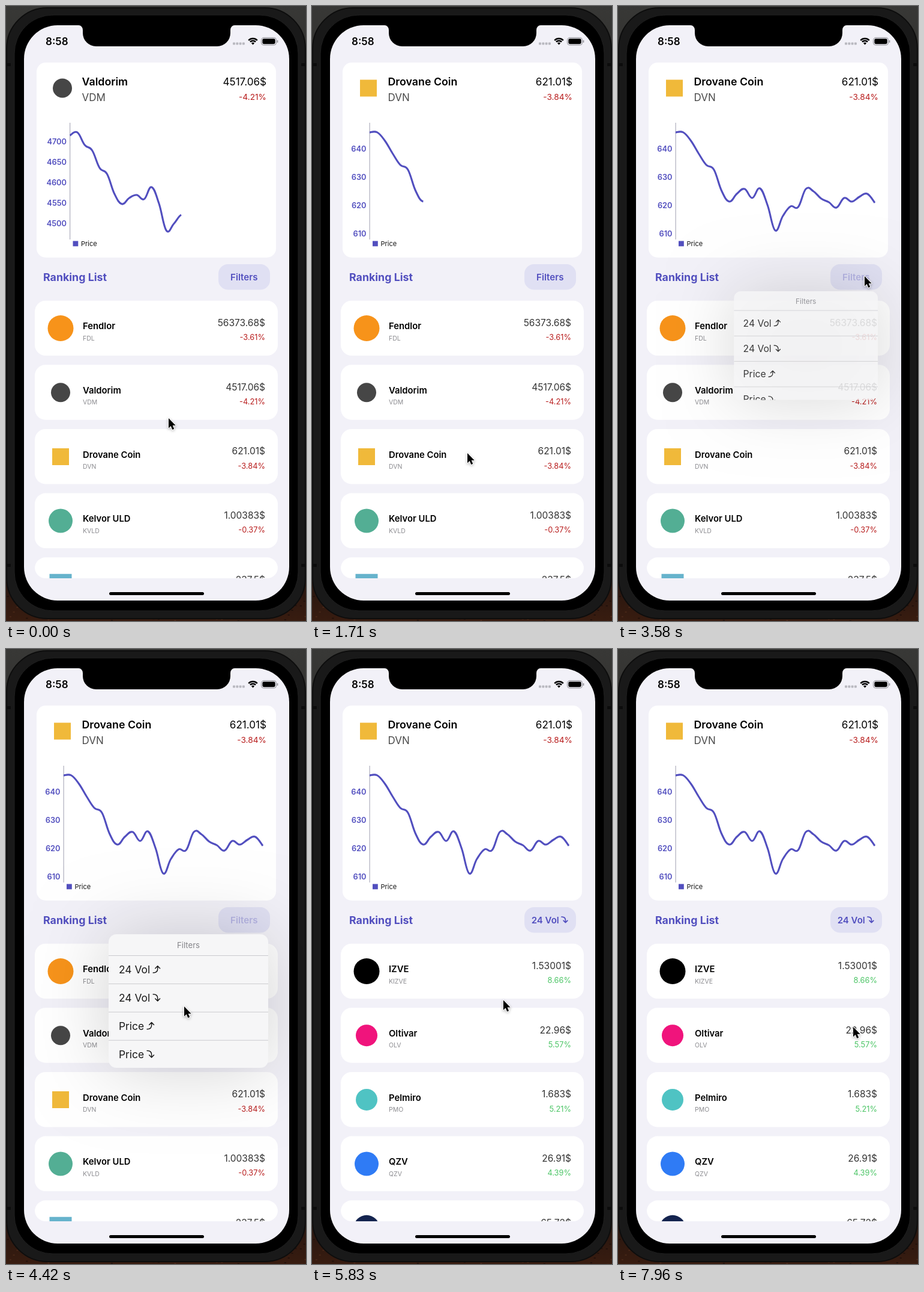
An HTML page with a canvas that plays this animation: 500x1022 px, repeating every 8000 ms.

```html
<!DOCTYPE html>
<html lang="en">
<head>
<meta charset="utf-8">
<title>Price tracker</title>
<style>
  html, body { margin: 0; width: 100%; height: 100%; overflow: hidden; background: #1a1512; }
  canvas { display: block; width: 500px; height: 1022px; }
</style>
</head>
<body>
<canvas id="stage" width="500" height="1022"></canvas>
<script>
const ctx = document.getElementById('stage').getContext('2d');
const LOOP = 8000, DRAW_TIME = 1500;
const COIN_SWITCH = 1185, MENU_OPEN = 3490, MENU_CLOSE = 4960, CLOSE_TIME = 200;
const INDIGO = '#524fbf', RED = '#b81d1d', GREEN = '#4cc566';

// Coins: name, code, price, change, icon shape, icon half size, icon colour
const coin = (name, code, price, change, shape, half, color) =>
  ({ name, code, price, change, shape, half, color });

const valdorim = coin('Valdorim', 'VDM', '4517.06$', '-4.21%', 'circle', 16, '#464646');
const drovane = coin('Drovane Coin', 'DVN', '621.01$', '-3.84%', 'square', 14, '#f0b93a');
const byRank = [
  coin('Fendlor', 'FDL', '56373.68$', '-3.61%', 'circle', 21.5, '#f7931a'),
  valdorim,
  drovane,
  coin('Kelvor ULD', 'KVLD', '1.00383$', '-0.37%', 'circle', 20, '#53ae94'),
  coin('', '', '237.5$', '', 'square', 18.5, '#66b3cc'),
];
const byVolume = [
  coin('IZVE', 'KIZVE', '1.53001$', '8.66%', 'circle', 21.5, '#000'),
  coin('Oltivar', 'OLV', '22.96$', '5.57%', 'circle', 18, '#f0147c'),
  coin('Pelmiro', 'PMO', '1.683$', '5.21%', 'circle', 18, '#4fc3c3'),
  coin('QZV', 'QZV', '26.91$', '4.39%', 'circle', 20, '#2f7bf5'),
  coin('', '', '65.72$', '', 'circle', 21.5, '#14244f'),
];

const charts = [
  { coin: valdorim, start: -835, axisX: 106.5, firstTick: 225, tickGap: 34.2,
    ticks: [4700, 4650, 4600, 4550, 4500],
    line: [215, 210, 231, 240, 269, 279, 312, 329, 319, 314, 321, 301, 328, 373,
           362, 347, 348, 320, 322, 332, 336, 344, 330, 334, 327, 323, 335] },
  { coin: drovane, start: COIN_SWITCH, axisX: 96, firstTick: 237, tickGap: 47.2,
    ticks: [640, 630, 620, 610],
    line: [210, 210, 224, 245, 264, 272, 307, 325, 312, 304, 319, 303, 331, 373,
           349, 333, 334, 304, 308, 320, 326, 335, 319, 325, 317, 312, 327] },
];

// Cursor tip: time, x, y
const cursorPath = [
  [0, 271, 685], [120, 271, 685], [620, 262, 738], [1040, 262, 738], [1180, 259, 743],
  [2320, 259, 743], [3200, 411, 446], [3330, 411, 449], [3620, 411, 449], [4290, 297, 592],
  [4420, 297, 594], [5500, 297, 594], [6570, 393, 548], [6660, 393, 548],
  [7420, 417, 675], [7960, 392, 628], [8000, 392, 628],
];

const clamp = v => Math.min(1, Math.max(0, v));
const mix = (a, b, p) => a + (b - a) * p;
const smooth = p => p * p * (3 - 2 * p);

function box(x, y, w, h, r, fill) {
  ctx.beginPath();
  ctx.roundRect(x, y, w, h, r);
  if (fill) { ctx.fillStyle = fill; ctx.fill(); }
}

function circle(x, y, r, fill) {
  ctx.beginPath();
  ctx.arc(x, y, r, 0, 7);
  ctx.fillStyle = fill;
  ctx.fill();
}

function stroke(path, color, width) {
  ctx.strokeStyle = color;
  ctx.lineWidth = width;
  ctx.stroke(path);
}

function text(str, x, y, size, weight, color, align = 'left') {
  ctx.font = `${weight} ${size}px Inter, "Open Sans", sans-serif`;
  ctx.fillStyle = color;
  ctx.textAlign = align;
  ctx.fillText(str, x, y);
}

function icon({ shape, half, color }, x, y) {
  if (shape === 'circle') circle(x, y, half, color);
  else box(x - half, y - half, half * 2, half * 2, 0, color);
}

const changeColor = change => change[0] === '-' ? RED : GREEN;

const arrowShape = new Path2D('M0 11.5 C5 11.5 7.5 9.5 7.5 5 V0.5 M3.6 4.3 L7.5 0.4 L11.4 4.3');

// Text followed by a bent arrow pointing up or down
function arrowLabel(str, up, x, y, size, weight, color) {
  text(str, x, y, size, weight, color);
  const scale = size / 17.4;
  ctx.save();
  ctx.translate(x + ctx.measureText(str).width + 5 * scale, y - 12.6 * scale);
  ctx.scale(scale, scale);
  if (!up) { ctx.translate(0, 12); ctx.scale(1, -1); }
  stroke(arrowShape, color, weight > 500 ? 2 : 1.5);
  ctx.restore();
}

const notch = new Path2D('M121 31 V32 A7 8 0 0 1 128 40 V45 A22 22 0 0 0 150 67 ' +
  'H352 A22 22 0 0 0 374 45 V40 A7 8 0 0 1 381 32 V31 Z');

function drawDevice() {
  const backdrop = ctx.createLinearGradient(0, 0, 0, 1022);
  backdrop.addColorStop(0, '#383836');
  backdrop.addColorStop(0.5, '#1c1714');
  backdrop.addColorStop(0.93, '#26150f');
  backdrop.addColorStop(1, '#381c10');
  ctx.fillStyle = backdrop;
  ctx.fillRect(0, 0, 500, 1022);
  for (let i = 0; i < 160; i++) {
    const x = (i * 73.7) % 500, y = 955 + (i * 31.3) % 67;
    ctx.fillStyle = i % 2 ? '#1d0f0a' : '#4c2a19';
    ctx.fillRect(x, y, 3, 1.5);
  }
  box(1, 3, 498, 1015, 68, '#191919');
  ctx.strokeStyle = '#0d0d0d';
  ctx.lineWidth = 2;
  ctx.stroke();
  box(14, 15, 473, 990, 64, '#000');
  ctx.strokeStyle = '#202020';
  ctx.lineWidth = 1;
  ctx.stroke();
  for (const x of [0, 492]) {
    for (const y of [95, 927]) { ctx.fillStyle = '#0c0c0c'; ctx.fillRect(x, y, 8, 5); }
  }
  box(30, 32, 442, 956, 56, '#f2f1f8');
  ctx.fillStyle = '#000';
  ctx.fill(notch);
  box(172, 974, 158, 5, 2.5, '#000');
}

function drawStatusBar() {
  text('8:58', 66, 64.5, 17, 600, '#000');
  for (let i = 0; i < 4; i++) box(378 + i * 5.3, 60.5, 4, 4, 1, '#b9b9c0');
  ctx.strokeStyle = '#000';
  ctx.lineWidth = 2.5;
  ctx.lineCap = 'butt';
  for (const r of [6.5, 10.3]) {
    ctx.beginPath();
    ctx.arc(411.5, 64.3, r, -Math.PI * 0.75, -Math.PI * 0.25);
    ctx.stroke();
  }
  ctx.lineCap = 'round';
  ctx.beginPath();
  ctx.moveTo(411.5, 64.6);
  ctx.arc(411.5, 64.3, 3.7, -Math.PI * 0.75, -Math.PI * 0.25);
  ctx.fillStyle = '#000';
  ctx.fill();
  box(425.5, 52.5, 25, 12.5, 4);
  ctx.strokeStyle = '#8e8e94';
  ctx.lineWidth = 1;
  ctx.stroke();
  box(427.3, 54.3, 21.4, 8.9, 2.4, '#000');
  box(451.7, 56.7, 1.6, 4.4, 1, '#8e8e94');
}

function drawChart({ coin, start, axisX, firstTick, tickGap, ticks, line }, t) {
  box(51, 94, 399, 324, 15, '#fff');
  icon(coin, 94, 136.5);
  text(coin.name, 126.5, 132, 17.8, 600, '#000');
  text(coin.code, 126.5, 157.5, 17, 400, '#4a4a4a');
  text(coin.price, 434, 132.3, 17.1, 400, '#000', 'right');
  text(coin.change, 434, 156, 13.7, 400, changeColor(coin.change), 'right');

  ctx.fillStyle = '#aeaebd';
  ctx.fillRect(axisX - 0.5, 194, 1.2, 194);
  ticks.forEach((tick, i) =>
    text(tick, axisX - 5.5, firstTick + i * tickGap + 4.6, 12.8, 600, INDIGO, 'right'));
  box(axisX + 5, 390.5, 8.8, 8.8, 0, INDIGO);
  text('Price', axisX + 18.5, 399, 11, 400, '#111');

  // The line grows by whole segments under a sine ease
  const last = line.length - 1;
  const phase = (1 - Math.cos(Math.PI * clamp((t - start) / DRAW_TIME))) / 2;
  const shown = Math.floor(last * phase + 1e-6);
  const step = (428 - axisX) / last;
  const at = i => { i = Math.min(last, Math.max(0, i)); return [axisX + i * step, line[i]]; };
  const k = 0.2;
  const curve = new Path2D();
  curve.moveTo(...at(0));
  for (let i = 1; i <= shown; i++) {
    const [a, b, c, d] = [at(i - 2), at(i - 1), at(i), at(i + 1)];
    curve.bezierCurveTo(b[0] + (c[0] - a[0]) * k, b[1] + (c[1] - a[1]) * k,
                        c[0] - (d[0] - b[0]) * k, c[1] - (d[1] - b[1]) * k, c[0], c[1]);
  }
  if (shown) {
    ctx.lineCap = 'butt';
    stroke(curve, INDIGO, 3.1);
    ctx.lineCap = 'round';
  }
}

function drawFilterButton(t) {
  text('Ranking List', 62, 456.5, 17.8, 700, INDIGO);
  box(354, 429, 86, 42.5, 16, '#e0e0f3');
  ctx.save();
  if (t < MENU_CLOSE + 100) {
    const opened = clamp((t - MENU_OPEN) / 80), closing = clamp((t - MENU_CLOSE) / 100);
    ctx.globalAlpha = mix(1, 0.3, opened) * (1 - closing);
    text('Filters', 396.8, 455.5, 15.1, 600, INDIGO, 'center');
  } else {
    ctx.globalAlpha = clamp((t - MENU_CLOSE - 115) / 300);
    arrowLabel('24 Vol', false, 365.7, 455.5, 15, 600, INDIGO);
  }
  ctx.restore();
}

function drawList(coins) {
  ctx.save();
  box(48, 489.5, 405, 461.5, 18);
  ctx.clip();
  coins.forEach((c, i) => {
    const top = 489.5 + i * 106.7;
    box(48, top, 405, 91.5, 18, '#fff');
    icon(c, 91, top + 46);
    text(c.name, 128, top + 47.7, 14.8, 600, '#000');
    text(c.code, 128, top + 66.2, 10.5, 400, '#8c8c90');
    text(c.price, 432, top + 42.3, 15.5, 400, '#333', 'right');
    text(c.change, 432, top + 65.6, 12.8, 400, changeColor(c.change), 'right');
  });
  ctx.restore();
}

function drawMenu(t) {
  if (t < MENU_OPEN || t > MENU_CLOSE + CLOSE_TIME) return;
  const closing = clamp((t - MENU_CLOSE) / CLOSE_TIME);
  const spring = (t - MENU_OPEN) * 0.038;
  const scale = closing ? 1 - 0.89 * closing : 1 - 0.7 * (1 + spring) * Math.exp(-spring);
  const width = 266, height = 222 * scale, left = -226.5;

  ctx.save();
  ctx.globalAlpha = closing ? 1 - closing ** 1.2 : clamp((t - MENU_OPEN) / 106);
  ctx.translate(397.5, 474);
  ctx.scale(scale, scale);
  ctx.shadowColor = 'rgba(0,0,0,0.18)';
  ctx.shadowBlur = 120 * scale;
  box(left, 0, width, height, 13, '#f6f6f7');
  ctx.shadowColor = 'transparent';
  ctx.clip();
  text('Filters', left + 133, 23.2, 13.2, 400, '#85858a', 'center');
  ['24 Vol', '24 Vol', 'Price', 'Price'].forEach((label, i) => {
    ctx.fillStyle = '#cbcbcf';
    ctx.fillRect(left, 35 + i * 46.9, width, 1);
    arrowLabel(label, i % 2 === 0, left + 17, 65 + i * 46.9, 17.4, 400, '#1a1a1a');
  });
  ctx.restore();
}

const pointer = new Path2D('M0 0 V16.4 L3.7 13 L6.3 19 L9.2 17.7 L6.7 11.9 H11.7 Z');

function drawCursor(t) {
  const i = cursorPath.findIndex(([time]) => time > t);
  const [a, b] = [cursorPath[i - 1], cursorPath[i]];
  const p = smooth((t - a[0]) / (b[0] - a[0]));
  ctx.save();
  ctx.translate(mix(a[1], b[1], p), mix(a[2], b[2], p));
  ctx.shadowColor = 'rgba(0,0,0,0.35)';
  ctx.shadowBlur = 4;
  ctx.shadowOffsetY = 1.5;
  stroke(pointer, '#fff', 1.8);
  ctx.shadowColor = 'transparent';
  ctx.fillStyle = '#000';
  ctx.fill(pointer);
  ctx.restore();
}

function frame() {
  const t = performance.now() % LOOP;
  ctx.lineCap = ctx.lineJoin = 'round';
  drawDevice();
  drawStatusBar();
  drawChart(charts[t < COIN_SWITCH ? 0 : 1], t);
  drawFilterButton(t);
  drawList(t < MENU_CLOSE ? byRank : byVolume);
  drawMenu(t);
  drawCursor(t);
  requestAnimationFrame(frame);
}
frame();
</script>
</body>
</html>
```
